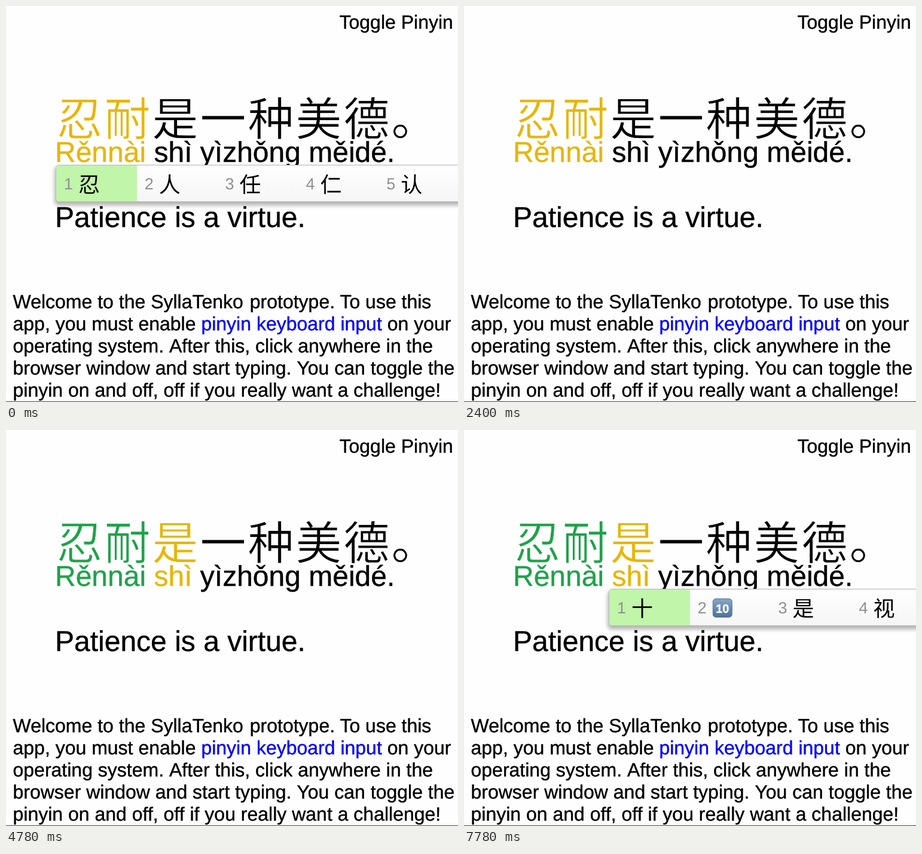
An HTML page for the animation above (8 s loop, 756 by 663 pixels).

```html
<!DOCTYPE html>
<html lang="zh-CN">
<head>
<meta charset="utf-8">
<title>Pinyin typing</title>
<style>
  html, body { margin: 0; width: 100%; height: 100%; overflow: hidden; background: #fefefe; }
  svg { display: block; width: 756px; height: 663px; color: #000; }
  text, tspan { fill: currentColor; stroke: currentColor; }
  text { font-family: "Liberation Sans", Arial, sans-serif; font-size: 32px; stroke-width: .4px; text-rendering: geometricPrecision; }
  .big { font-size: 48px; }
  .han { font-family: "Noto Sans CJK SC", "Noto Sans CJK", sans-serif; }
  /* a page-coloured outline thins the strokes */
  .line, .line tspan { font-size: 77px; letter-spacing: 3px; stroke: #fefefe; stroke-width: .8px; }
  .cand { font-size: 36px; stroke: none; }
  .num { font-size: 27px; color: #8f8f8f; stroke: none; }
  .ten { font-size: 20px; font-weight: bold; color: #fff; text-anchor: middle; }
  .link { color: #00f; }
</style>
</head>
<body>
<svg viewBox="0 0 756 663" xmlns="http://www.w3.org/2000/svg">
  <defs>
    <linearGradient id="panel" x2="0" y2="1">
      <stop offset="0" stop-color="#fefefe"/><stop offset="1" stop-color="#f6f6f6"/>
    </linearGradient>
    <linearGradient id="key" x2="0" y2="1">
      <stop offset="0" stop-color="#86a6c6"/><stop offset="1" stop-color="#4c7299"/>
    </linearGradient>
    <filter id="blur" filterUnits="userSpaceOnUse" x="-30" y="230" width="900" height="140">
      <feGaussianBlur stdDeviation="3"/>
    </filter>
  </defs>
  <rect width="756" height="663" fill="#fefefe"/>
  <text x="557.5" y="38">Toggle Pinyin</text>
  <text class="han line" x="84.5" y="217"><tspan class="w0">忍耐</tspan><tspan class="w1">是</tspan>一种美德。</text>
  <text class="big" x="82" y="261"><tspan class="w0">Rěnnài</tspan> <tspan class="w1">shì</tspan> yìzhǒng měidé.</text>
  <text class="big" x="82" y="369.5">Patience is a virtue.</text>
  <text x="11.5" y="506">Welcome to the SyllaTenko <tspan dx="2">prototype. To use this</tspan></text>
  <text x="11.5" y="543">app, you must enable <tspan class="link">pinyin keyboard input</tspan> on your</text>
  <text x="11.5" y="580">operating system. <tspan dx="1.8">After this, click anywhere in the</tspan></text>
  <text x="11.5" y="617">browser window and start typing. <tspan dx=".6">You can toggle the</tspan></text>
  <text x="11.5" y="654">pinyin on and off, off if you really want a challenge!</text>
  <rect y="662" width="756" height="1" fill="#444"/>
  <g id="popup">
    <rect x="-2" y="269" width="800" height="65" rx="7" fill="#000" opacity=".28" filter="url(#blur)"/>
    <rect x=".5" y="266.5" width="800" height="61" rx="5" fill="url(#panel)" stroke="#b9b9b9"/>
    <path d="M136 267V327H5.5Q1 327 1 322V272Q1 267 5.5 267Z" fill="#c0f5aa"/>
    <g id="cells"></g>
  </g>
</svg>
<script>
const LOOP = 8000, STEP = 134.8;
const BLACK = '#000', GOLD = '#e6b60a', GREEN = '#1fa24a', RED = '#d8262c';
const $ = id => document.getElementById(id);

// time, first word colour, second word colour, popup left edge, candidates
const states = [
  [0, GOLD, BLACK, 83, '忍 人 任 仁 认'],
  [150, GOLD, BLACK, 83, '忍耐 人脑 人内 忍 任内'],
  [300, GOLD, BLACK, 83, '人那 忍那 人 忍 仁'],
  [450, GOLD, BLACK, 83, '忍耐 人奶 人 忍 任'],
  [2400, GOLD, BLACK],
  [2540, GREEN, BLACK],
  [2990, GREEN, GOLD, 242, '十 KEY 是 时'],
  [3290, GREEN, GOLD, 242, '十 KEY 是 时候'],
  [3440, GREEN, GOLD, 242, '十 KEY 是 视'],
  [4780, GREEN, GOLD],
  [4930, GREEN, RED],
  [5680, GREEN, BLACK],
  [7480, GREEN, GOLD, 242, '十 KEY 是 时'],
  [7630, GREEN, GOLD, 242, '十 KEY 是 时候'],
  [7780, GREEN, GOLD, 242, '十 KEY 是 视']
];

const keycap = x => `<rect x="${x + 1.5}" y="282.5" width="32" height="31" rx="5" fill="url(#key)" stroke="#55789c"/>
  <text class="ten" x="${x + 17.5}" y="305.5">10</text>`;

function cell(word, i) {
  const x = i * STEP, at = x + 38;
  const body = word === 'KEY' ? keycap(at) : `<text class="han cand" x="${at}" y="311.5">${word}</text>`;
  return `<text class="num" x="${x + 14}" y="307">${i + 1}</text>${body}`;
}

function paint(name, colour) {
  document.querySelectorAll('.' + name).forEach(e => { e.style.color = colour; });
}

let shown;
function draw(ms) {
  const t = ms % LOOP;
  const state = states.filter(s => s[0] <= t).pop();
  if (state === shown) return;
  shown = state;
  const [, first, second, left, words] = state;
  paint('w0', first);
  paint('w1', second);
  $('popup').style.display = words ? '' : 'none';
  if (words) {
    $('popup').setAttribute('transform', `translate(${left} 0)`);
    $('cells').innerHTML = words.split(' ').map(cell).join('');
  }
}

const start = performance.now();
function tick() {
  draw(performance.now() - start);
  requestAnimationFrame(tick);
}
tick();
</script>
</body>
</html>
```
